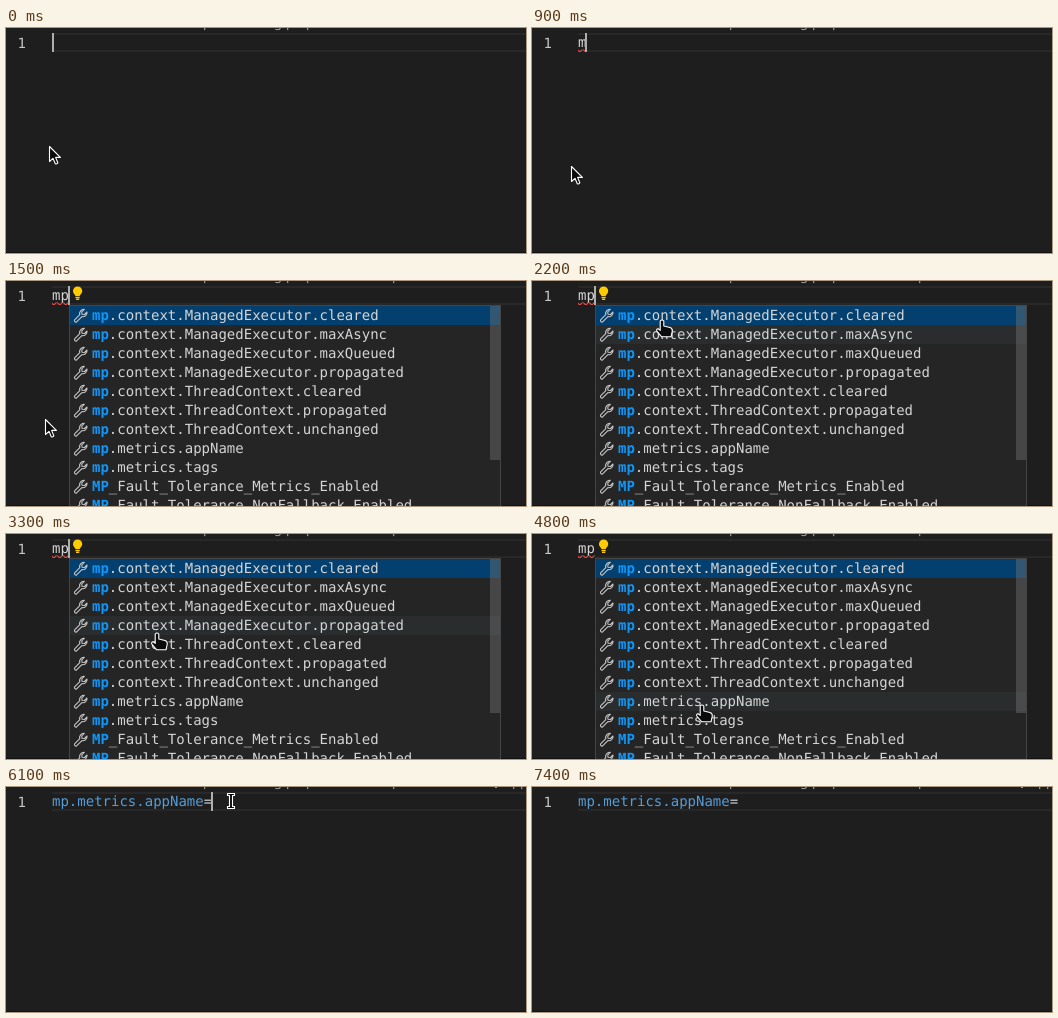
These frames come from a looping animation (520 by 225 pixels, 7.9 s). An HTML page:

```html
<!DOCTYPE html>
<html lang="en">
<head>
<meta charset="utf-8">
<title>Property completion</title>
<style>
  html, body { margin: 0; width: 100%; height: 100%; overflow: hidden; background: #1e1e1e; }
  svg { display: block; width: 520px; height: 225px; }
  text { font: 14px "DejaVu Sans Mono", monospace; fill: #d4d4d4; white-space: pre; text-rendering: geometricPrecision; }
  .crumb { font: 13px "Noto Sans", sans-serif; fill: #a0a0a0; }
  .match { font-weight: bold; fill: #0d97fb; }
  .pointer path { fill: #0b0b0b; stroke: #fff; stroke-width: 1.1; stroke-linejoin: round; }
</style>
</head>
<body>
<svg viewBox="0 0 520 225">
  <defs>
    <pattern id="wave" x="46" y="21" width="6" height="3" patternUnits="userSpaceOnUse">
      <path fill="#f44747" d="M5.5 0 2.5 3H1.1L4.1 0ZM4 0 6 2V.6L5.4 0ZM0 2 1 3H2.4L0 .6Z"/>
    </pattern>
    <path id="wrench" fill="none" stroke="#c5c5c5" stroke-width="1.1" stroke-linejoin="round"
      d="M14 4.5 11.5 7 9 6.8 8.8 4.4 11.3 1.8A4.2 4.2 0 0 0 6.8 7.2L1.6 12.4A1.5 1.5 0 0 0 3.6 14.4L8.9 9.1A4.2 4.2 0 0 0 14 4.5Z"/>
  </defs>
  <rect width="520" height="225" fill="#1e1e1e"/>
  <rect y="224" width="520" height="1" fill="#121212"/>
  <path d="M46 6H520M46 23H520" stroke="#282828" stroke-width="2"/>

  <text class="crumb" y="-1" x="197 268 280 300">pgpp</text>
  <text class="crumb" y="-1" x="386" id="crumbGroup">p</text>
  <g id="crumbKey">
    <rect x="489" width="2" height="1" fill="#a0a0a0"/>
    <text class="crumb" y="-1" x="506 514">pp</text>
  </g>

  <text x="11.5" y="20" style="fill:#c6c6c6">1</text>
  <text x="46" y="19"><tspan id="key"></tspan><tspan id="equals">=</tspan></text>
  <rect id="squiggle" x="46" y="21" height="3" fill="url(#wave)"/>
  <g id="bulb">
    <path fill="#fc0" d="M69.5 15.2C69.5 13.6 67 13 67 10A4.6 4.6 0 0 1 76.2 10C76.2 13 73.7 13.6 73.7 15.2Z"/>
    <path stroke="#fc0" stroke-width="1.2" d="M69.5 16.6H73.7M70 18.4H73.2"/>
  </g>
  <rect id="caret" y="5" width="2" height="19" fill="#aeafad"/>

  <g id="popup">
    <rect x=".5" y="24.5" width="431" height="215" fill="#252526" stroke="#454545"/>
    <rect x="1" y="25" width="430" height="19" fill="#04406f"/>
    <rect id="hover" x="1" width="430" height="19" fill="#2a2d2e"/>
    <g id="rows"></g>
    <rect id="slider" x="421" y="25" width="10" fill="#797979" fill-opacity=".4"/>
  </g>

  <g id="pointer" class="pointer">
    <path id="arrow" d="M.5 .5V15.5L4 12.3 6.3 17.8Q7.6 18.4 8.8 16.8L6.6 11.4H11.4Z"/>
    <path id="hand" d="M-1.8 1Q0 -1 1.8 1V6L8 7.5Q10.4 8.2 10.3 11L9 16.8H-.3L-5.2 11Q-5.8 8.6 -3.8 8.8L-1.8 10.4Z"/>
    <path id="beam" d="M-3.5 -5.5H3.5V-3.5H1.5V7.5H3.5V9.5H-3.5V7.5H-1.5V-3.5H-3.5Z"/>
  </g>
</svg>
<script>
const LOOP = 7900, STEP = 100, ROW = 19, TOP = 25;
const names = [
  "mp.context.ManagedExecutor.cleared",
  "mp.context.ManagedExecutor.maxAsync",
  "mp.context.ManagedExecutor.maxQueued",
  "mp.context.ManagedExecutor.propagated",
  "mp.context.ThreadContext.cleared",
  "mp.context.ThreadContext.propagated",
  "mp.context.ThreadContext.unchanged",
  "mp.metrics.appName",
  "mp.metrics.tags",
  "MP_Fault_Tolerance_Metrics_Enabled",
  "MP_Fault_Tolerance_NonFallback_Enabled"
];

// time, x, y of the pointer's hot spot
const path = [
  [0, 43, 118], [300, 39, 138], [1600, 39, 138], [1800, 47, 127], [2000, 98, 72],
  [2100, 119, 50], [2200, 130, 39], [2400, 132, 37], [2700, 132, 37], [3000, 139, 58],
  [3200, 148, 86], [3300, 151, 99], [3500, 156, 134], [3900, 170, 171], [5500, 170, 171],
  [5800, 200, 85], [6100, 225, 12], [6700, 225, 12], [6900, 160, 4], [7000, 104, -4],
  [7100, 80, -30], [LOOP, 80, -30]
];
// caret toggles, starting visible
const blinks = [300, 800, 1700, 2200, 2800, 3300, 3800, 4300, 4800, 4900, 5400, 5900, 6500, 7000, 7400];

const $ = id => document.getElementById(id);
const show = (id, on) => $(id).style.display = on ? "" : "none";
const set = (id, attr, value) => $(id).setAttribute(attr, value);

$("rows").innerHTML = names.map((name, i) =>
  `<use href="#wrench" x="4" y="${TOP + i * ROW + 1.5}"/>` +
  `<text x="23" y="${TOP + i * ROW + 14}"><tspan class="match"></tspan><tspan></tspan></text>`
).join("");
const labels = [...$("rows").querySelectorAll("text")];

function pointerAt(t) {
  const i = Math.max(1, path.findIndex(p => p[0] >= t));
  const [t0, x0, y0] = path[i - 1], [t1, x1, y1] = path[i];
  const k = (t - t0) / (t1 - t0);
  return [Math.round(x0 + (x1 - x0) * k), Math.round(y0 + (y1 - y0) * k)];
}

function drawPopup(t, typed) {
  const open = t >= 1100 && t < 4900;
  show("popup", open);
  if (!open) return;
  const left = typed === 1 ? 54 : 63;
  set("popup", "transform", `translate(${left} 0)`);
  labels.forEach((label, i) => {
    label.children[0].textContent = names[i].slice(0, typed);
    label.children[1].textContent = names[i].slice(typed);
  });
  // the highlight trails the pointer by one step
  const [x, y] = pointerAt(t - STEP);
  const row = Math.floor((y - TOP) / ROW);
  show("hover", x > left && row > 0);
  set("hover", "y", TOP + row * ROW);
  set("slider", "height", typed === 1 ? 38 : 154);
  set("slider", "opacity", t >= 1700 && t < 2100 ? 1 - (t - 1600) / 800 : 1);
}

function draw(t) {
  const typed = t < 900 ? 0 : t < 1200 ? 1 : 2;
  const done = t >= 4900;

  $("key").textContent = done ? "mp.metrics.appName" : "mp".slice(0, typed);
  $("key").style.fill = done ? "#569cd6" : "#d4d4d4";
  show("equals", done);
  set("squiggle", "width", [0, 9, 17][typed]);
  show("squiggle", t < 5000);
  show("bulb", t >= 1500 && t < 5000);
  show("crumbGroup", t >= 1500);
  show("crumbKey", t >= 5300);

  set("caret", "x", done ? 205 : [46, 53, 62][typed]);
  show("caret", blinks.filter(b => b <= t).length % 2 === 0);

  drawPopup(t, typed);

  const [x, y] = pointerAt(t);
  const shape = t >= 5000 ? "beam" : x > 63 ? "hand" : "arrow";
  for (const id of ["arrow", "hand", "beam"]) show(id, id === shape);
  set("pointer", "transform", `translate(${x} ${y})`);
}

const start = performance.now();
let last = -1;
function tick() {
  const t = Math.floor((performance.now() - start) % LOOP / STEP) * STEP;
  if (t !== last) draw(last = t);
  requestAnimationFrame(tick);
}
tick();
</script>
</body>
</html>
```
